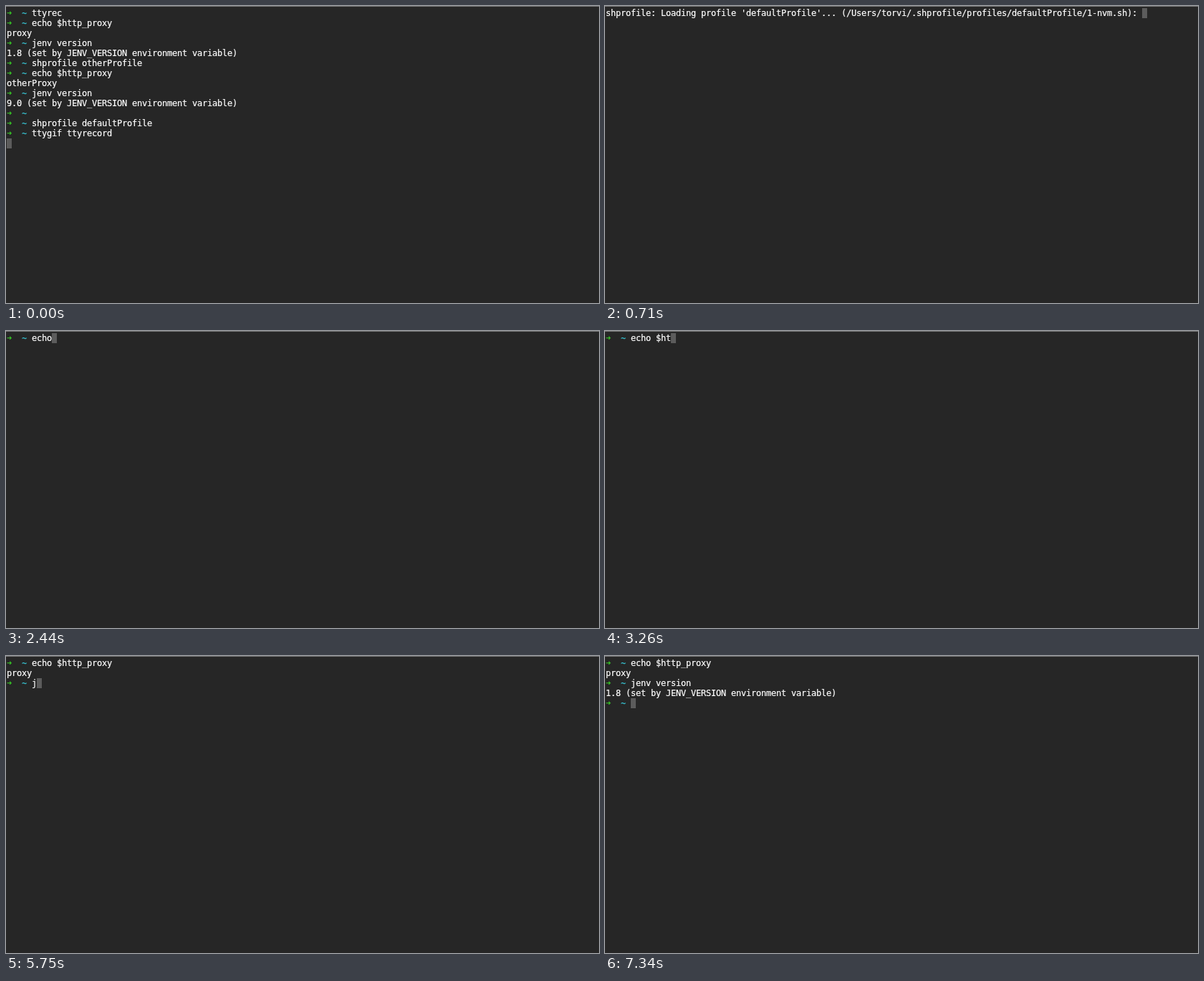
Write an HTML page that moves like this. It is 828x415 px and loops after 8000 ms.

```html
<!DOCTYPE html>
<html lang="en">
<head>
<meta charset="utf-8">
<title>Terminal session</title>
<style>
  html, body { margin: 0; width: 100%; height: 100%; overflow: hidden; background: #262626; }
  svg { display: block; }
  text {
    font: 12px "DejaVu Sans Mono", "Liberation Mono", monospace;
    white-space: pre;
    fill: #fff;
    stroke: #fff;
    stroke-width: .2px;
  }
  .arrow, .path { font-weight: bold; stroke: none; }
  .arrow { fill: #36c926; }
  .path { fill: #35bccb; }
</style>
</head>
<body>
<svg width="828" height="415" viewBox="0 0 828 415">
  <rect width="828" height="415" fill="#262626"/>
  <rect width="828" height="1" fill="#757575"/>
  <rect id="cursor" width="7" height="14" fill="#5c5c5c"/>
  <g id="screen"></g>
</svg>
<script>
const LOOP = 8000, CELL = 7, LINE = 14, LEFT = 1, TOP = 3, ASCENT = 11;
const PROMPT = "➜  ~ ";
const screenEl = document.getElementById("screen");
const cursorEl = document.getElementById("cursor");

const history = [
  PROMPT + "ttyrec",
  PROMPT + "echo $http_proxy",
  "proxy",
  PROMPT + "jenv version",
  "1.8 (set by JENV_VERSION environment variable)",
  PROMPT + "shprofile otherProfile",
  PROMPT + "echo $http_proxy",
  "otherProxy",
  PROMPT + "jenv version",
  "9.0 (set by JENV_VERSION environment variable)",
  PROMPT,
  PROMPT + "shprofile defaultProfile",
  PROMPT + "ttygif ttyrecord",
  ""
];
const loading = file =>
  `shprofile: Loading profile 'defaultProfile'... (/Users/torvi/.shprofile/profiles/defaultProfile/${file}): `;

// Each step is [start time, lines]; the cursor sits after the last line.
const steps = [[0, history]];
const show = (time, ...lines) => steps.push([time, lines]);

// Types a command up to each given length, evenly from start to end.
function type(start, end, done, command, from, to = from) {
  for (let n = from; n <= to; n++) {
    const part = to > from ? (n - from) / (to - from) : 0;
    show(start + (end - start) * part, ...done, PROMPT + command.slice(0, n));
  }
}

show(150, "");
show(250, loading("0-proxy.sh"));
show(710, loading("1-nvm.sh"));
show(980, loading("2-jenv.sh"));
show(1050, loading("3-alias.sh"));
show(1120, "");
show(1330, PROMPT);

const echo = "echo $http_proxy";
type(2140, 2270, [], echo, 1, 3);
type(2440, 2440, [], echo, 4);
type(2780, 2780, [], echo, 5);
type(3020, 3120, [], echo, 6, 7);
type(3260, 3320, [], echo, 8, 9);
type(3630, 3630, [], echo, 10);
type(4140, 4250, [], echo, 11, 12);
type(4390, 4390, [], echo, 13);
type(4770, 4770, [], echo, 16);
show(4880, PROMPT + echo, "");

const done = [PROMPT + echo, "proxy"];
const jenv = "jenv version";
show(5000, ...done, PROMPT);
type(5750, 5750, done, jenv, 1);
type(5890, 6680, done, jenv, 2, 9);
type(6780, 6860, done, jenv, 10, 11);
type(7140, 7140, done, jenv, 12);
show(7240, ...done, PROMPT + jenv, "");
show(7340, ...done, PROMPT + jenv, history[4], PROMPT);

// Puts every character on the terminal grid.
function addText(str, col, row, cls = "") {
  const el = document.createElementNS("http://www.w3.org/2000/svg", "text");
  el.setAttribute("x", [...str].map((_, i) => LEFT + (col + i) * CELL).join(" "));
  el.setAttribute("y", TOP + row * LINE + ASCENT);
  el.setAttribute("class", cls);
  el.textContent = str;
  screenEl.append(el);
}

function addLine(line, row) {
  if (!line.startsWith(PROMPT)) return addText(line, 0, row);
  addText("➜", 0, row, "arrow");
  addText("~", 3, row, "path");
  addText(line.slice(PROMPT.length), PROMPT.length, row);
}

let current = null;
function draw(time) {
  const lines = steps.findLast(step => step[0] <= time)[1];
  if (lines === current) return;
  current = lines;
  screenEl.replaceChildren();
  lines.forEach(addLine);
  const row = lines.length - 1;
  cursorEl.setAttribute("x", LEFT + lines[row].length * CELL);
  cursorEl.setAttribute("y", TOP + row * LINE);
}

const begin = performance.now();
function tick() {
  draw((performance.now() - begin) % LOOP);
  requestAnimationFrame(tick);
}
tick();
</script>
</body>
</html>
```
